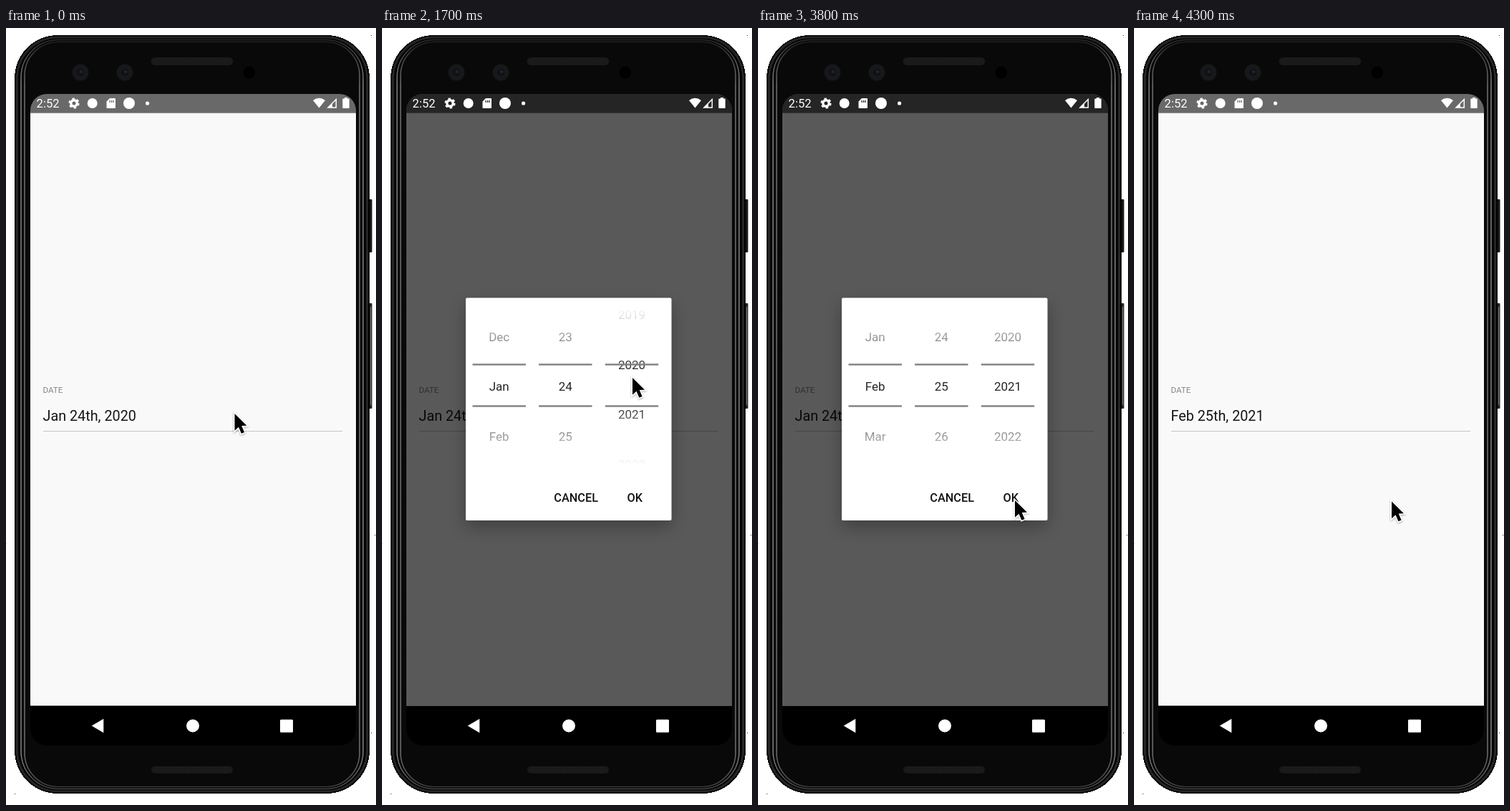
Recreate the animation shown at these times as an HTML page. Size 517 by 1084 pixels, loop 4500 ms.

```html
<!DOCTYPE html>
<html lang="en">
<head>
<meta charset="utf-8">
<title>Date picker</title>
<style>
  html, body { margin: 0; width: 100%; height: 100%; overflow: hidden; background: #fff; }
  svg { display: block; width: 517px; height: 1084px; }
  text { font-family: Roboto, sans-serif; }
  .wheel { font-size: 17px; fill: #262626; text-anchor: middle; }
  .button { font-size: 16.3px; font-weight: 500; fill: #111; }
  .line { fill: none; }
</style>
</head>
<body>
<svg viewBox="0 0 517 1084" xmlns="http://www.w3.org/2000/svg">
  <defs>
    <linearGradient id="fade" gradientUnits="userSpaceOnUse" x1="0" y1="390" x2="0" y2="610">
      <stop offset="0" stop-color="#000"/>
      <stop offset=".4" stop-color="#fff"/>
      <stop offset=".6" stop-color="#fff"/>
      <stop offset="1" stop-color="#000"/>
    </linearGradient>
    <mask id="edges" maskUnits="userSpaceOnUse" x="117" y="390" width="288" height="220">
      <rect x="117" y="390" width="288" height="220" fill="url(#fade)"/>
    </mask>
    <linearGradient id="rim" x1="0" y1="0" x2="0" y2="1">
      <stop offset="0" stop-color="#2a2a2a"/>
      <stop offset=".06" stop-color="#8c8c8c"/>
      <stop offset=".95" stop-color="#8c8c8c"/>
      <stop offset="1" stop-color="#444"/>
    </linearGradient>
    <pattern id="mesh" width="3" height="3" patternUnits="userSpaceOnUse">
      <rect width="3" height="3" fill="#1d1d1d"/>
      <rect width="1.5" height="1.5" fill="#111"/>
    </pattern>
    <clipPath id="screen"><rect x="34" y="92" width="455" height="909" rx="23"/></clipPath>
    <filter id="lift" x="-30%" y="-30%" width="160%" height="160%">
      <feDropShadow dx="0" dy="9" stdDeviation="12" flood-opacity=".3"/>
    </filter>
    <filter id="drop" x="-40%" y="-30%" width="180%" height="170%">
      <feDropShadow dx="0" dy="1" stdDeviation="1" flood-opacity=".4"/>
    </filter>
  </defs>

  <!-- phone body -->
  <g fill="#222">
    <rect x="505" y="239" width="6.5" height="74" rx="1" fill="#161616"/>
    <rect x="505" y="384" width="6.5" height="147" rx="1" fill="#222"/>
    <rect x="509" y="389" width="1.2" height="137" fill="#777"/>
    <path d="M510 10h1v1h-1zM515 707h1v1h-1zM510 983h1v1h-1zM12 1068h1v1h-1z"/>
    <path d="M0 719h1v1h-1z" fill="#ccc"/>
  </g>
  <rect x="12" y="10" width="496" height="1058" rx="60" fill="#000" shape-rendering="crispEdges"/>
  <g class="line">
    <rect x="15.5" y="13" width="489" height="1052" rx="57" stroke="#252525" stroke-width="3"/>
    <rect x="21" y="16.5" width="478" height="1045" rx="52" fill="#090909" stroke="url(#rim)" stroke-width="1.4"/>
    <rect x="26" y="19.5" width="468" height="1039" rx="47" stroke="url(#rim)" stroke-width="1.2"/>
  </g>
  <rect x="203" y="41" width="114" height="11" rx="5" fill="url(#mesh)"/>
  <rect x="203" y="1030" width="114" height="10" rx="5" fill="url(#mesh)"/>
  <g id="lenses"></g>
  <circle cx="340" cy="62" r="8.5" fill="#000"/>

  <!-- screen -->
  <g clip-path="url(#screen)">
    <rect x="34" y="92" width="455" height="909" fill="#000"/>
    <rect x="34" y="92" width="455" height="26.5" fill="#696969"/>
    <rect x="34" y="118.5" width="455" height="827" fill="#f9f9f9"/>
    <text x="51.5" y="508.7" font-size="11.6" fill="#858585">DATE</text>
    <text id="date" x="51.5" y="547.7" font-size="19.8" fill="#151515"></text>
    <rect x="52" y="562" width="418" height="1" fill="#c4c4c4"/>
    <rect id="dim" x="34" y="92" width="455" height="853.5"/>

    <g fill="#fff">
      <text x="42.6" y="111" font-size="16.6">2:52</text>
      <circle class="line" cx="95" cy="105" r="4.2" stroke="#fff" stroke-width="3.4"/>
      <circle class="line" cx="95" cy="105" r="6.3" stroke="#fff" stroke-width="2.6" stroke-dasharray="3.3"/>
      <circle cx="120.7" cy="105" r="7"/>
      <path fill-rule="evenodd" d="M145 98h7q1 0 1 1v12q0 1-1 1h-10.500q-1 0-1-1v-8.500zM144.500 101v3h1.300v-3zM147 101v3h1.300v-3zM149.500 101v3h1.300v-3z"/>
      <circle cx="172" cy="105" r="8"/>
      <circle cx="197.6" cy="105" r="2.6"/>
      <path d="M437.500 111.500L429 101q8.500-6.500 17 0z"/>
      <path class="line" d="M450 111L461.300 99.500V111z" stroke="#fff" stroke-width="1.5"/>
      <path d="M450 111l6-6v6z"/>
      <path d="M473 97h4v1.500h2q.7 0 .7.700v12q0 .8-.8.800h-7.800q-.8 0-.8-.8v-12q0-.7.700-.7h2z"/>
      <path d="M119.700 973.500L136.300 963.800V983.200z"/>
      <circle cx="261" cy="973.500" r="9"/>
      <rect x="383" y="964.700" width="18" height="18" rx="1.5"/>
    </g>
  </g>

  <!-- picker dialog -->
  <g id="dialog">
    <rect x="117" y="376.500" width="287.500" height="310.500" rx="2" fill="#fff" filter="url(#lift)"/>
    <g id="wheels" mask="url(#edges)"></g>
    <g id="rules" fill="#808080"></g>
    <circle id="ripple" cx="359" cy="663" r="22.5" opacity=".035"/>
    <text class="button" x="240.300" y="661">CANCEL</text>
    <text class="button" x="342.500" y="661">OK</text>
  </g>

  <g id="cursor">
    <path d="M0 0V23.800L5.500 18.800L9.400 27.800L13.600 26L9.700 17.100L17 16.700Z" stroke="#fff" stroke-width="3" paint-order="stroke" filter="url(#drop)"/>
  </g>
</svg>
<script>
  const LOOP = 4500, TICK = 100, ROW = 69.5;
  const $ = id => document.getElementById(id);

  function add(parent, tag, attrs, content = '') {
    const el = document.createElementNS('http://www.w3.org/2000/svg', tag);
    for (const key in attrs) el.setAttribute(key, attrs[key]);
    el.textContent = content;
    return parent.appendChild(el);
  }

  for (const cx of [104, 166]) {
    add($('lenses'), 'circle', { cx, cy: 62, r: 11.5, fill: '#17181a' });
    add($('lenses'), 'circle', { cx, cy: 62, r: 6.5, fill: '#111216', stroke: '#1e2024' });
    add($('lenses'), 'circle', { cx: cx + 1, cy: 61, r: 2, fill: '#24272e' });
  }

  const columns = [
    { x: 163.7, start: 3200, items: ['Dec', 'Jan', 'Feb', 'Mar'] },
    { x: 256.3, start: 2200, items: [23, 24, 25, 26] },
    { x: 349, start: 1400, items: [2019, 2020, 2021, 2022] }
  ];
  for (const col of columns) {
    col.group = add($('wheels'), 'g', {});
    col.items.forEach((item, i) =>
      add(col.group, 'text', { class: 'wheel', x: col.x, y: 506 + (i - 1) * ROW }, item));
    for (const y of [468.3, 526.3])
      add($('rules'), 'rect', { x: col.x - 37.2, y, width: 74.4, height: 2.4 });
  }

  // Rows: time, then values, joined linearly.
  const path = [
    [0, 319.5, 538], [200, 319.5, 538], [300, 317, 539], [800, 317, 539],
    [900, 313, 541], [1200, 283.5, 565], [1300, 325, 570], [1400, 355, 558],
    [1500, 356, 546], [1700, 350, 488], [1800, 344, 478], [2000, 321, 518],
    [2200, 270.5, 541], [2300, 269, 523], [2500, 265, 478], [2600, 266, 472],
    [2800, 284, 538], [2900, 242, 584], [3100, 167, 565], [3200, 167, 554],
    [3400, 169, 502], [3500, 187, 504], [3700, 312, 632], [3800, 359, 659],
    [3900, 360, 660.5], [LOOP, 360, 660.5]
  ];
  // Rows: time, dialog opacity, backdrop opacity.
  const fades = [
    [0, 0, 0], [400, 0, 0], [500, .4, .2], [600, .91, .478], [700, 1, .642],
    [4000, 1, .642], [4100, .78, .574], [4200, .15, .15], [4300, 0, 0], [LOOP, 0, 0]
  ];

  function at(keys, t) {
    const i = keys.findIndex(key => key[0] > t);
    const [a, b] = [keys[i - 1], keys[i]];
    const u = (t - a[0]) / (b[0] - a[0]);
    return [1, 2].map(k => a[k] + (b[k] - a[k]) * u);
  }

  function roll(t, start) {
    const u = Math.min(1, Math.max(0, (t - start) / 600));
    return 1 - (1 - u * u) ** 2;
  }

  function draw(now) {
    const t = Math.floor(now % LOOP / TICK) * TICK;
    const [show, dim] = at(fades, t);
    $('dialog').setAttribute('opacity', show);
    $('dim').setAttribute('opacity', dim);
    $('ripple').setAttribute('visibility', t >= 4100 ? 'visible' : 'hidden');
    $('date').textContent = t < 4200 ? 'Jan 24th, 2020' : 'Feb 25th, 2021';
    $('cursor').setAttribute('transform', `translate(${at(path, t)})`);
    for (const col of columns)
      col.group.setAttribute('transform', `translate(0 ${-ROW * roll(t, col.start)})`);
  }

  const begin = performance.now();
  function tick() {
    draw(performance.now() - begin);
    requestAnimationFrame(tick);
  }
  tick();
</script>
</body>
</html>
```
